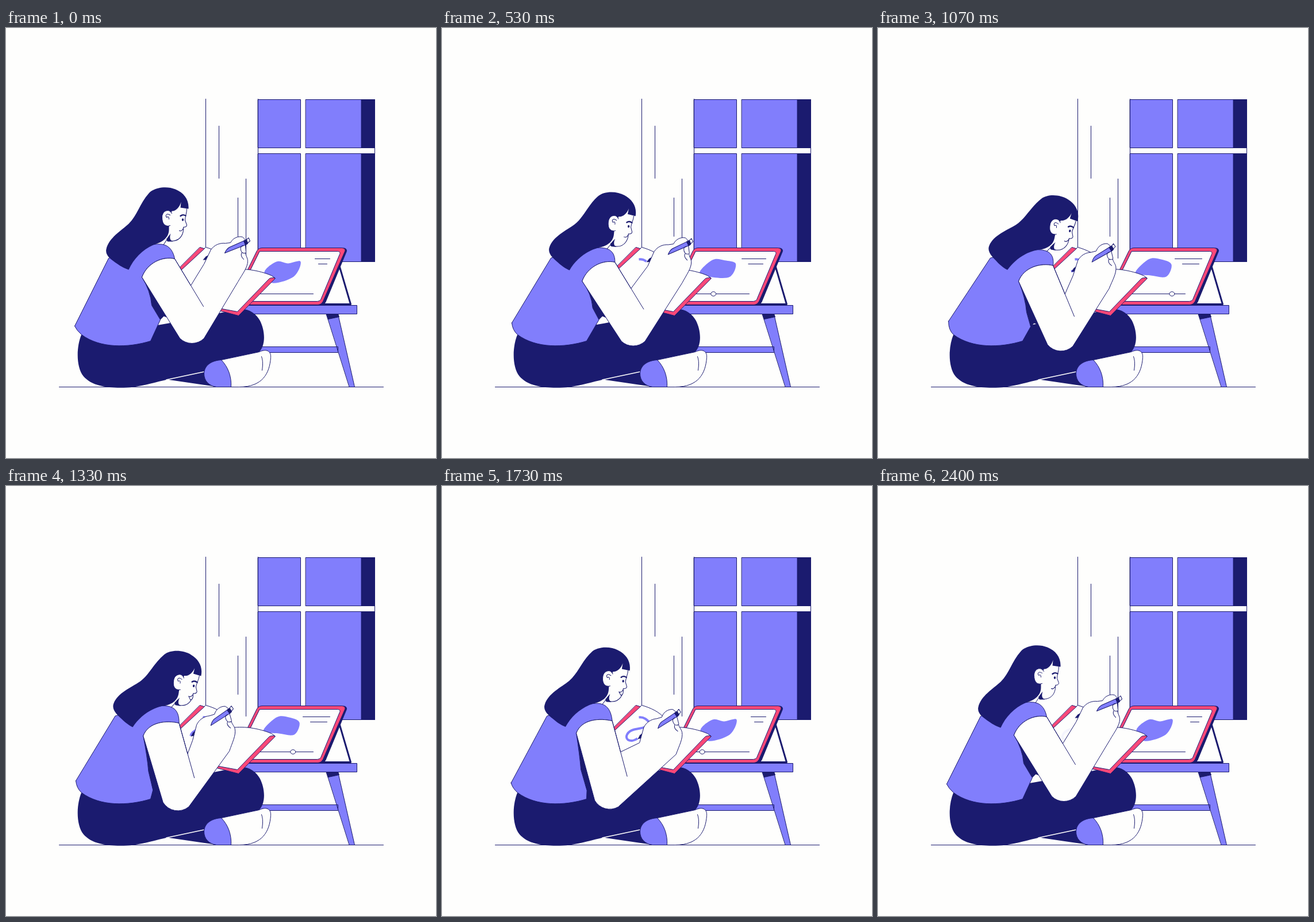
An HTML page for the animation above (2430 ms loop, 748 by 748 pixels).

```html
<!DOCTYPE html>
<html lang="en">
<head>
<meta charset="utf-8">
<title>Sketching by the window</title>
<style>
  html, body { margin: 0; width: 100%; height: 100%; overflow: hidden; background: #fefefd; }
  svg { display: block; width: 100vw; height: 100vh; }
  .navy { fill: #1b1b6f; }
  .lilac { fill: #817efc; }
  .pink { fill: #fd4878; }
  .white { fill: #fefefd; }
  .line { stroke: #1b1b6f; stroke-width: 1; stroke-linejoin: round; stroke-linecap: round; }
  .open { fill: none; }
</style>
</head>
<body>
<svg viewBox="-.5 -.5 748 748">
  <!-- wall and window -->
  <path class="line open" d="M347 123V382M370 170V261M403 295V362M417 262V400M92 624H656"/>
  <g class="line">
    <path class="lilac" d="M438 124H512V208H438ZM521 124H618V208H521ZM438 218H512V406H438ZM521 218H618V406H521Z"/>
    <path class="navy" d="M618 124H641V208H618ZM618 218H641V406H618Z"/>
    <path class="open" d="M438 123V406M641 124V406"/>
  </g>

  <!-- table -->
  <g class="line">
    <path class="lilac" d="M425 554H577V564H425ZM557 497H577L606 624H597ZM400 482H610V497H400Z"/>
    <path class="navy" d="M557 497H577L579 502L560 506Z"/>
  </g>

  <!-- tablet -->
  <path class="line open" style="stroke-width:3" d="M579 412L599 480H548"/>
  <path class="navy" d="M448 382H588Q594 384 592 389L556 476Q553 482 546 482H390Z"/>
  <path class="pink line" d="M445 382H584Q591 383 589 388L551 475Q548 481 541 481H390L436 387Q439 382 445 382Z"/>
  <path class="white line" d="M441 388H577Q582 389 580 393L547 472Q545 475 541 475H398Z"/>
  <path id="blob" class="lilac"/>
  <path id="notes" class="line open"/>
  <path class="line open" d="M425 462H534"/>
  <ellipse id="knob" class="white line" cy="462" rx="4.5" ry="3.8"/>

  <!-- legs and shoe -->
  <path class="navy" d="M131 532C121 556 122 590 134 605C150 624 180 626 210 625C230 624 250 618 280 611L362 623L374 577L440 563C452 550 450 525 441 508C434 496 424 489 408 488L283 513L260 517L200 530Z"/>
  <path class="open" stroke="#fefefd" stroke-width="1.4" d="M278 611.5L344 597.5"/>
  <path class="white line" d="M374 577L440 563C452 557 461 561 460 573C458 600 446 624 405 624H380Z"/>
  <path class="lilac line" d="M344 601C344 587 356 578 374 577C386 589 392 606 391 624H366C352 622 344 613 344 601Z"/>
  <path class="line open" d="M444 571C447 579 446 588 445 595"/>

  <!-- sketchbook -->
  <path class="pink line" d="M337 381L347 384L386 430L460 432L468 435L404 500L290 470L288 430Z"/>
  <path class="white line" d="M347 381C362 385 379 393 388 405V421C410 416 440 421 461 430L467 434C462 434 459 434 457 436L402 493L310 476L292 432L344 384Z"/>
  <path id="ink" class="open" stroke="#817efc" stroke-width="4" pathLength="100"
    d="M342 402C350 401 358 406 361 413C356 421 342 421 334 423C322 426 317 436 323 441C330 445 342 440 347 430"/>

  <!-- face and neck -->
  <g class="head">
    <path class="white" d="M284 345V318L304 300L314 314L311 334L308 360L290 370L270 390L258 376Z"/>
    <path class="line open" d="M314 314C314 322 311 328 311 334L314 342Q314 346 308 346C309 356 304 369 290 370C284 370 281 368 279 366M283 362L270 382"/>
    <path class="navy" d="M286 357C281 363 276 369 281 371L290 371C284 369 284 363 286 357Z"/>
    <path class="line open" style="stroke-width:2.4" d="M303 326.5Q307 323 312 326"/>
    <ellipse id="eye" class="navy" cx="307" cy="333"/>
    <path id="mouth" class="white line"/>
  </g>

  <path id="vest" class="lilac line"/>
  <path id="shade" class="navy"/>

  <!-- hair and ear -->
  <g class="head">
    <path class="navy" d="M303 312L317 314C318 298 309 286 294 280C280 274 258 276 248 287C232 305 228 325 213 340C200 352 178 365 174 384C171 396 185 404 192 409C200 415 207 418 213 420C222 400 238 384 258 376C272 372 283 364 283 350V335L288 318C296 318 302 310 304 302Z"/>
    <path class="white" d="M288 322C283 313 271 317 271 329C271 341 277 346 285 343L290 332Z"/>
    <path class="line open" d="M288 322C283 313 271 317 271 329C271 341 277 346 285 343M285 325C279 321 276 325 279 329Q283 326 283 332"/>
  </g>

  <!-- pencil tip, arm, pencil -->
  <g class="grip"><path class="navy" d="M343 403L348 397L358 392L352 403Z"/></g>
  <path id="arm" class="white line"/>
  <path id="crease" class="line open"/>
  <g class="grip line">
    <path class="lilac" d="M381 391Q384 384 389 381L416 369L419 376L391 387Z"/>
    <path class="navy" d="M414 370L419 367.5L421 374.5L417 377Z"/>
    <path class="white" d="M419 367.5L422.5 364.5L425 370L421 373.5Z"/>
    <path class="open" d="M413 378C407 379 408 386 411 390C408 394 411 399 414 402M411 390Q414 392 417 391"/>
  </g>
</svg>
<script>
const LOOP = 2430;
const HIP = [190, 540];
const PEN = [344, 402];

const $ = id => document.getElementById(id);
const set = (el, attrs) => { for (const k in attrs) el.setAttribute(k, attrs[k]); };
const all = (sel, attrs) => document.querySelectorAll(sel).forEach(el => set(el, attrs));
const mix = (a, b, k) => a + (b - a) * k;
const between = (p, q, k) => [mix(p[0], q[0], k), mix(p[1], q[1], k)];
const clamp = x => Math.min(1, Math.max(0, x));
const ease = (t, a, b) => { const k = clamp((t - a) / (b - a)); return k * k * (3 - 2 * k); };
const ink = $('ink');
const inkLength = ink.getTotalLength();

// Rotate a point about c, then carry c to its new place.
function turn([x, y], deg, c, to = c) {
  const a = deg * Math.PI / 180, cos = Math.cos(a), sin = Math.sin(a);
  const dx = x - c[0], dy = y - c[1];
  return [to[0] + dx * cos - dy * sin, to[1] + dx * sin + dy * cos];
}

// Offset p by r, square to the direction a-b.
function beside(p, a, b, r) {
  const dx = b[0] - a[0], dy = b[1] - a[1], len = Math.hypot(dx, dy);
  return [p[0] - dy / len * r, p[1] + dx / len * r];
}

// Closed smooth curve through a few points.
function loopPath(pts) {
  const at = i => pts[(i + pts.length) % pts.length];
  const handle = (i, s) => at(i).map((v, k) => v + s * (at(i + 1)[k] - at(i - 1)[k]) / 6);
  return `M${pts[0]}` + pts.map((p, i) => `C${handle(i, 1)} ${handle(i + 1, -1)} ${at(i + 1)}`).join('') + 'Z';
}

const progress = t => ease(t, 60, 2150);

function penTip(t) {
  const p = ink.getPointAtLength(progress(t) * inkLength);
  return between([p.x + 1, p.y], [343, 402], ease(t, 2130, 2410));
}

function drawBody(t) {
  const lean = 7.2 * ease(t, 0, 900) - 5.6 * ease(t, 960, 1760) - 1.6 * ease(t, 1760, 2400);
  const tilt = 4 * (ease(t, 0, 1200) - ease(t, 1330, 2400));
  const swing = ease(t, 700, 1400) - ease(t, 1900, 2420);
  const twist = -9.5 * swing - .4 * lean;
  const pen = penTip(t);

  const body = (x, y) => turn([x, y], lean, HIP);
  const hand = (x, y) => turn([x, y], twist, PEN, pen);
  const joint = (x, y, lx, ly, sx, sy) => [x + lx * lean + sx * swing, y + ly * lean + sy * swing];

  all('.head', { transform: `rotate(${lean} ${HIP}) rotate(${tilt} 255 375)` });
  all('.grip', { transform: `translate(${pen}) rotate(${twist}) translate(${PEN.map(v => -v)})` });

  const pit = joint(236, 433, 1.6, 1.5, -5.5, -6);
  const cap = joint(293, 401, 1.6, 1.3, 0, 5);
  const elbow = joint(323, 518, 2, 1, -35, 12);
  const fold = joint(343, 484, 1.6, 1, -24, 19);
  const side = joint(253, 482, 1.9, 1, -15, 9);
  const hem = joint(268, 507, 1, 0, -18, 22);
  const hole = `C${cap[0] - 21} ${cap[1] - 5} ${pit[0] + 9} ${pit[1] - 25} ${pit}`;
  const edge = `Q${side[0] - 2} ${side[1] - 25} ${side}L${hem}`;

  const back = body(119, 518);
  set($('vest'), { d: `M${back}Q${body(143, 470)} ${body(178, 400)}L${body(230, 382)}L${body(257, 376)}
    C${body(272, 374)} ${body(288, 376)} ${cap}${hole}${edge}Q${between(hem, [251, 544], .5)} 251 544
    C212 556 163 557 131 533Q122 525 ${back}Z` });
  set($('shade'), { d: `M${pit}${edge}L${hem[0] + 6} ${hem[1] - 6}L${elbow}Z` });

  const wrist = hand(404, 441);
  set($('arm'), { d: `M${pit}L${beside(elbow, pit, elbow, 30)}A30 30 0 0 0 ${beside(elbow, elbow, wrist, 30)}L${wrist}
    C${hand(412, 427)} ${hand(421, 416)} ${hand(421, 405)}C${hand(421, 399)} ${hand(416, 394)} ${hand(418, 389)}
    L${hand(416, 367)}L${hand(412, 363)}C${hand(404, 361)} ${hand(395, 365)} ${hand(391, 373)}L${hand(382, 374)}
    C${hand(372, 373)} ${hand(363, 377)} ${hand(357, 385)}L${hand(345, 410)}L${between(cap, fold, .56)}L${cap}${hole}Z` });
  set($('crease'), { d: `M${cap}L${fold}` });
}

function drawFace(t) {
  const shut = ease(t, 1930, 2000) - ease(t, 2070, 2140);
  const grin = ease(t, 1100, 1250) - ease(t, 2050, 2250);
  set($('eye'), { rx: mix(1.7, 4, shut), ry: mix(2.2, .6, shut) });
  set($('mouth'), { d: `M301 352Q305 354 308 348Q${mix(305, 310, grin)} ${mix(354, 356, grin)} ${mix(301, 305, grin)} ${mix(352, 358, grin)}Z` });
}

const bean = [[449, 424], [470, 406], [490, 409], [512, 406], [500, 432], [463, 443]];
const arch = [[447, 426], [470, 402], [492, 402], [510, 411], [501, 432], [474, 430]];

function drawScreen(t) {
  const k = ease(t, 300, 640) - ease(t, 1440, 1720);
  set($('blob'), { d: loopPath(bean.map((p, i) => between(p, arch[i], k))) });
  set($('notes'), { d: `M${537 - 21 * k} 401H563M${543 - 14 * k} 410H558` });
  set($('knob'), { cx: 461 + 50 * Math.cos((t - 1055) / LOOP * 2 * Math.PI) });
}

function drawInk(t) {
  set(ink, {
    'stroke-dasharray': `${progress(t) * 100} 200`,
    opacity: t < 60 ? 0 : 1 - .92 * ease(t, 2130, 2400)
  });
}

const start = performance.now();
function tick() {
  const t = Math.max(0, performance.now() - start) % LOOP;
  drawBody(t);
  drawFace(t);
  drawScreen(t);
  drawInk(t);
  requestAnimationFrame(tick);
}
tick();
</script>
</body>
</html>
```
